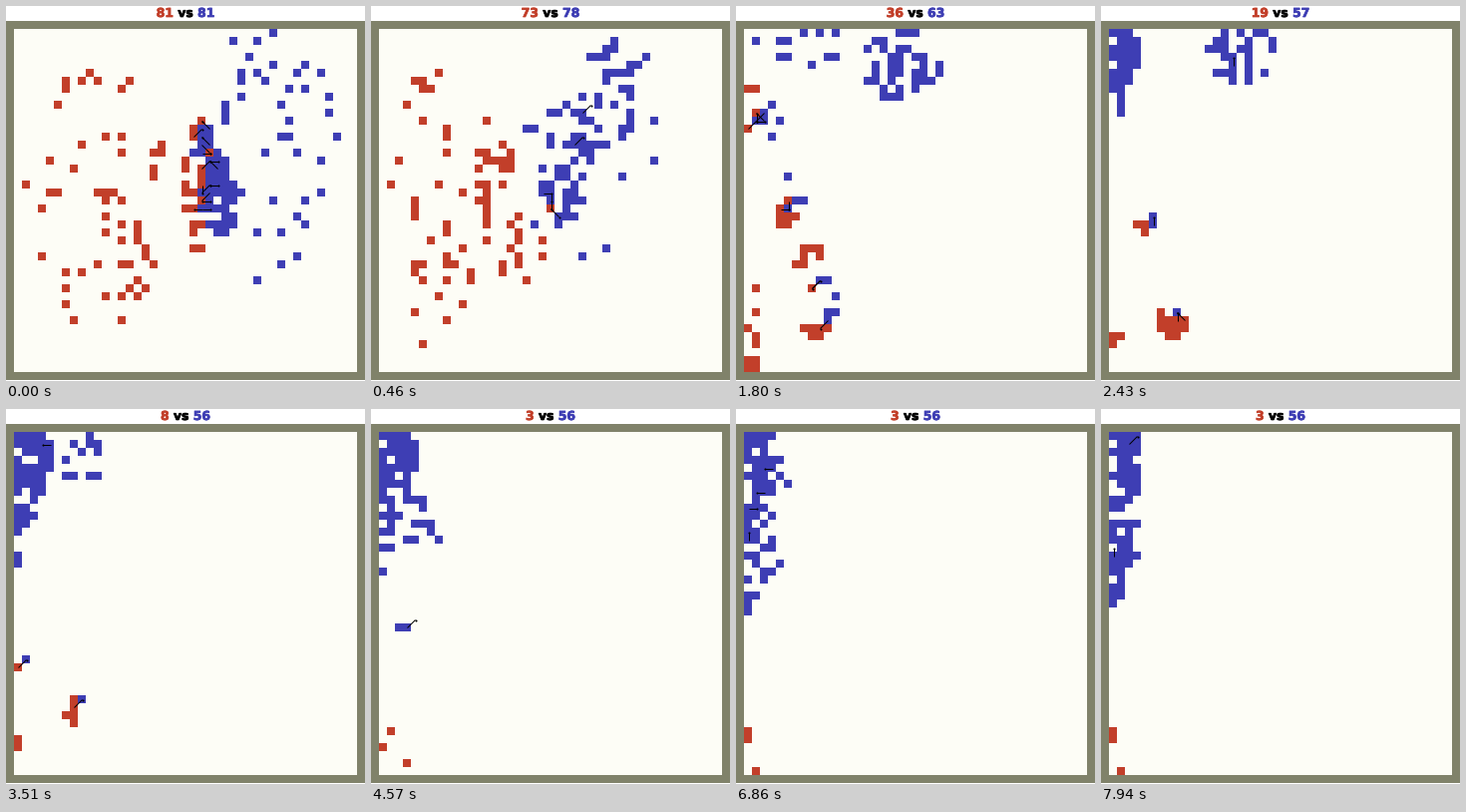
These frames come from a looping animation (360 by 376 pixels, 8000 ms). A matplotlib script:

```python
import random
from itertools import pairwise

import matplotlib.pyplot as plt
import numpy as np
from matplotlib.animation import FuncAnimation
from matplotlib.collections import LineCollection
from matplotlib.colors import to_rgb
from matplotlib.patches import Rectangle
from matplotlib.patheffects import withStroke

W, H, CELL, SIZE = 360, 376, 8, 43
LEFT, TOP = 8, 23
LOOP, TICK, STEP, LAST = 8000, 20, 30, 265
SAND, WALL, RED, BLUE = "#fdfdf6", "#80826a", "#c23f2a", "#3e3eb4"
FONT_PX = 12.4
DIGIT, SPACE, VS = 0.696 * FONT_PX, 0.348 * FONT_PX, 1.247 * FONT_PX

rng = random.Random(11)
CELLS = [(c, r) for r in range(SIZE) for c in range(SIZE)]

# step: groups of (units, centre col, centre row, col radius, row radius)
RED_KEYS = {
    0: [(27, 22.6, 19, 1.8, 9), (54, 10, 21, 9, 17)],
    31: [(34, 1, 28, 3.5, 15), (8, 1.5, 6.5, 2, 2), (7, 9, 16, 4, 2.5),
         (10, 13.5, 19, 2.2, 3.5), (9, 16.5, 27, 2, 3.5)],
    60: [(5, 0.5, 9.5, 1, 3.5), (8, 4.7, 23, 1.3, 2), (8, 8, 29, 2, 3),
         (6, 8.5, 37.4, 2, 0.8), (9, 0.5, 36.5, 1.2, 6)],
    81: [(4, 4.5, 24, 1.5, 1), (12, 7.5, 36.4, 1.9, 2), (3, 0.5, 39, 1, 2)],
    117: [(5, 7, 34.5, 0.8, 1.7), (1, 0, 29, 0.5, 0.5), (2, 0, 38, 0.5, 1.2)],
    166: [(2, 0, 37.5, 0.5, 0.7), (1, 1, 42, 0.5, 0.5)],
}
BLUE_KEYS = {
    0: [(32, 25.5, 20.5, 2.4, 5), (6, 23.5, 13, 1.2, 2), (43, 31, 15, 9, 17)],
    31: [(33, 21, 2.5, 5, 3.2), (16, 27, 9, 5, 3), (12, 8, 7, 7, 8),
         (11, 18, 24, 1.6, 5)],
    60: [(36, 19, 4, 5, 4.5), (11, 6, 1.5, 6, 3), (6, 2.5, 11, 1.5, 2.5),
         (4, 6, 20, 2, 3), (6, 10, 33, 2, 5)],
    81: [(28, 0, 0, 3.3, 10), (26, 16, 2.5, 4.5, 3.7), (2, 4.5, 23, 1.6, 1.2),
         (1, 8, 35, 0.5, 0.5)],
    117: [(40, 0, 0, 4.4, 11), (11, 8.5, 3, 3.5, 3.5), (3, 0, 15, 0.5, 3),
          (1, 1, 28, 0.5, 0.5), (1, 8, 33, 0.5, 0.5)],
    167: [(51, 0, 0, 3.2, 18), (5, 2, 20, 2.5, 4)],
    LAST: [(52, 0, 0, 3.1, 20), (4, 3, 9, 1.5, 6)],
}


def muster(groups):
    """Random free cells of each ellipse, spilling to the nearest ones outside."""
    free, units = set(CELLS), []
    for n, cx, cy, rx, ry in groups:
        def rank(cell):
            d = ((cell[0] - cx) / rx) ** 2 + ((cell[1] - cy) / ry) ** 2
            return max(d, 1) + 0.2 * rng.random()
        picked = sorted((c for c in CELLS if c in free), key=rank)[:n]
        free.difference_update(picked)
        units += picked
    return units


def gap(a, b):
    return max(abs(a[0] - b[0]), abs(a[1] - b[1]))


def match(units, goals):
    """Pair the nearest units and goals; those left over will fall."""
    pairs = sorted((gap(u, g), i, j) for i, u in enumerate(units)
                   for j, g in enumerate(goals))
    aim, used = {}, set()
    for _, i, j in pairs:
        if i not in aim and j not in used:
            aim[i] = goals[j]
            used.add(j)
    return aim


def march(keys, wobble=0.54):
    """Cells held at each step while units shuffle from pose to pose."""
    poses = [(step, muster(groups)) for step, groups in keys.items()]
    states = [poses[0][1]]
    for (a, units), (b, goals) in pairwise(poses):
        aim, spot = match(units, goals), dict(enumerate(units))
        fall = {i: rng.randint(a + 1, b) for i in spot if i not in aim}
        for i in fall:
            aim[i] = min(goals, key=lambda g: gap(g, units[i]))
        for s in range(a + 1, b + 1):
            spot = {i: p for i, p in spot.items() if fall.get(i, s + 1) > s}
            if s == b:
                spot = {i: aim[i] for i in spot}
            taken = set(spot.values())
            rest = min(b - s + 1, 40)
            for i, p in spot.items():
                q = tuple(v + round((g - v) / rest + rng.uniform(-wobble, wobble))
                          for v, g in zip(p, aim[i]))
                if s < b and q not in taken and all(0 <= v < SIZE for v in q):
                    taken.discard(p)
                    taken.add(q)
                    spot[i] = q
            states.append(list(spot.values()))
    return states + [states[-1]] * (LAST + 1 - len(states))


def fights(reds, blues):
    """Shots at neighbouring foes, and a few stray ones, as (col, row, dx, dy)."""
    shots = []
    for side, foes in ((reds, blues), (blues, reds)):
        for u in side:
            near = [f for f in foes if gap(u, f) == 1]
            if near and rng.random() < 0.4:
                f = rng.choice(near)
                shots.append((*u, f[0] - u[0], f[1] - u[1]))
    for u in blues:
        if rng.random() < 0.025:
            shots.append((*u, *rng.choice([(1, 0), (-1, 0), (0, -1), (1, -1)])))
    return shots


reds, blues = march(RED_KEYS), march(BLUE_KEYS)
shots = [fights(r, b) for r, b in zip(reds, blues)]

fig = plt.figure(figsize=(W / 100, H / 100), dpi=100, facecolor="white")
ax = fig.add_axes((0, 0, 1, 1))
ax.axis("off")
ax.add_patch(Rectangle((0, 15), W, 360, color=WALL, lw=0))
end = SIZE * CELL
field = ax.imshow(np.ones((SIZE, SIZE, 3)), interpolation="nearest",
                  extent=(LEFT, LEFT + end, TOP + end, TOP), aspect="auto",
                  zorder=2)
ax.set(xlim=(0, W), ylim=(H, 0))
beams = LineCollection([], colors="black", linewidths=0.72, zorder=3)
ax.add_collection(beams)
tips = ax.scatter([], [], s=2.2, c="black", lw=0, zorder=4)


def label(text, color):
    return ax.text(0, 11, text, color=color, family="DejaVu Sans",
                   weight="bold", size=FONT_PX * 0.72, va="baseline",
                   path_effects=[withStroke(linewidth=0.5, foreground=color)])


red_text, vs_text, blue_text = label("", RED), label("vs", "black"), label("", BLUE)


def center(c, r):
    return LEFT + CELL * c + 4.5, TOP + CELL * r + 4.5


def draw(frame):
    step = min((frame * TICK + 10) // STEP, LAST)
    grid = np.full((SIZE, SIZE, 3), to_rgb(SAND))
    for units, color in ((reds[step], RED), (blues[step], BLUE)):
        for c, r in units:
            grid[r, c] = to_rgb(color)
    field.set_data(grid)

    lines = [(center(c, r), center(c + dx, r + dy)) for c, r, dx, dy in shots[step]]
    beams.set_segments(lines)
    tips.set_offsets(np.array([b for _, b in lines]).reshape(-1, 2))

    n, m = str(len(reds[step])), str(len(blues[step]))
    x = W / 2 - (DIGIT * len(n + m) + 2 * SPACE + VS) / 2
    red_text.set(text=n, x=x)
    x += DIGIT * len(n) + SPACE
    vs_text.set_x(x)
    blue_text.set(text=m, x=x + VS + SPACE)
    return field, beams, tips, red_text, vs_text, blue_text


anim = FuncAnimation(fig, draw, frames=LOOP // TICK, interval=TICK,
                     repeat=True, repeat_delay=0, blit=False)
plt.show()
```
